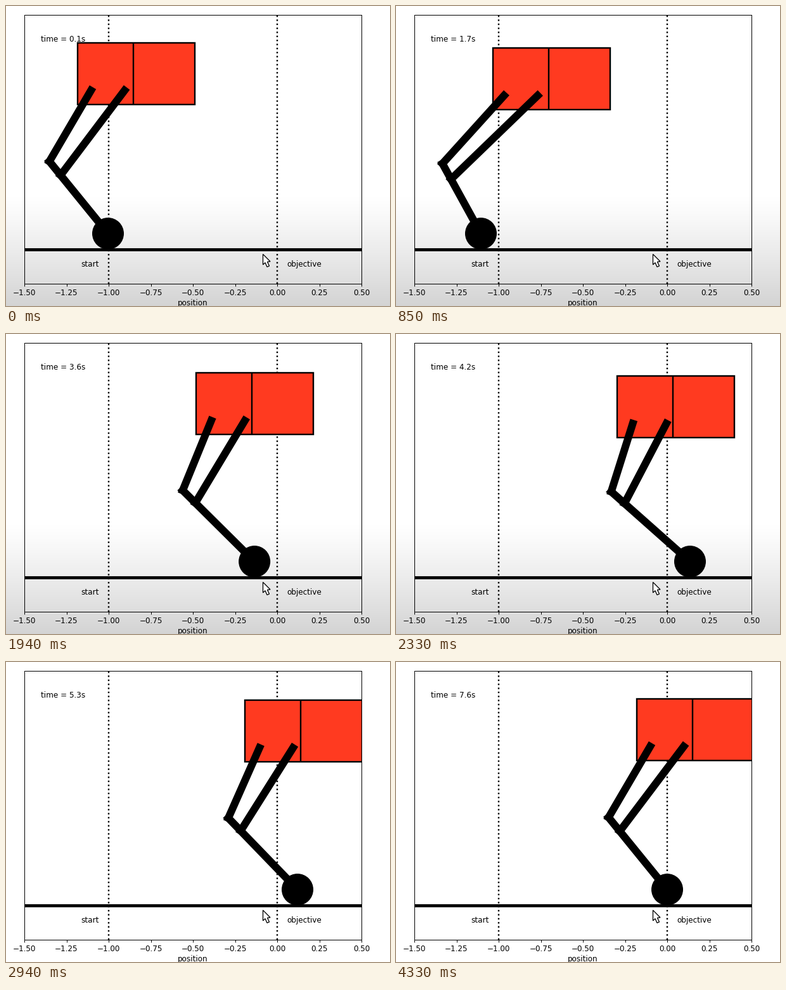
A matplotlib script that plays this animation: 606 by 472 pixels, repeating every 4.39 s.

```python
import numpy as np
import matplotlib.pyplot as plt
from matplotlib.animation import FuncAnimation
from matplotlib.patches import Circle, Polygon, Rectangle

W, H, DPI = 606, 472, 64
PX = 72 / DPI  # points per pixel
LOOP, STEP = 4390, 10
LEFT, RIGHT, TOP, BOTTOM = 29, 561, 14, 437
GROUND, WHEEL_Y, WHEEL_R = 383.5, 358, 25
BOX_W, BOX_H, DIVIDER = 185, 97, 88

plt.rcParams.update({"font.family": "DejaVu Sans", "font.size": 12 * PX})


def smooth_curve(keys):
    """Cubic Hermite curve through (time, value) keys, at rest at both ends."""
    ts, vs = np.array(keys, float).T
    slopes = np.gradient(vs, ts)
    slopes[0] = slopes[-1] = 0

    def value(t):
        i = int(np.clip(np.searchsorted(ts, t, side="right") - 1, 0, len(ts) - 2))
        h = ts[i + 1] - ts[i]
        u = (t - ts[i]) / h
        return ((1 + 2 * u) * (1 - u) ** 2 * vs[i] + u * (1 - u) ** 2 * h * slopes[i]
                + u * u * (3 - 2 * u) * vs[i + 1] + u * u * (u - 1) * h * slopes[i + 1])

    return value


# Left edge of the box, and how far the wheel trails behind its rest place
box_x = smooth_curve([(0, 113), (400, 125), (850, 153), (1120, 178), (1460, 236),
                      (2180, 330), (2330, 349), (2940, 377), (3460, 380),
                      (3900, 380), (LOOP, 380)])
lean = smooth_curve([(0, 0), (400, 42), (850, 67), (1150, 54), (1460, 15), (1900, -40),
                     (2330, -67), (2940, -35), (3460, 0), (3900, 0), (LOOP, 0)])


def clock(ms):
    return np.interp(ms, [0, 850, 2940, 4330, LOOP], [0.1, 1.68, 5.28, 7.62, 7.64])


def shade_level(ms):
    return np.interp(ms, [2400, 2650, 3380, 3450, 3560, 3780], [1, 0, 0, 1, 1, 0])


fig = plt.figure(figsize=(W / DPI, H / DPI), dpi=DPI, facecolor="white")
ax = fig.add_axes([LEFT / W, 1 - BOTTOM / H, (RIGHT - LEFT) / W, (BOTTOM - TOP) / H])
ax.set(xlim=(LEFT, RIGHT), ylim=(BOTTOM, TOP))
ax.patch.set_visible(False)
for spine in ax.spines.values():
    spine.set_linewidth(PX)

positions = np.linspace(-1.5, 0.5, 9)
labels = [f"{p:.2f}".replace("-", "\u2212") for p in positions]
ax.set_xticks(np.linspace(LEFT, RIGHT, 9), labels)
ax.set_yticks([])
ax.tick_params(axis="x", length=4.2 * PX, width=PX, pad=4.2 * PX)

# Grey shade rising from the bottom edge
ramp = 0.17 * np.linspace(1, 0, 172) ** 1.15
ramp = np.repeat(ramp[:, None, None], W, axis=1).repeat(3, axis=2)
shade = fig.figimage(1 - ramp, 0, 0, origin="lower", zorder=-1)


def line(width, xs=(), ys=(), **kw):
    return ax.plot(xs, ys, color="black", lw=width * PX, **kw)[0]


def label(x, y, text, **kw):
    return ax.text(x, y, text, va="baseline", **kw)


for x in (162, 428):
    line(2.4, (x, x), (BOTTOM, TOP), ls=":", zorder=1)
line(4.8, (LEFT, RIGHT), (GROUND, GROUND), zorder=2)

box = ax.add_patch(Rectangle((0, 0), BOX_W, BOX_H, fc="#ff3a20", ec="black",
                             lw=2.4 * PX, zorder=3))
divider = line(2.4, zorder=4, solid_capstyle="butt")
thigh, strut, shank = (line(12, zorder=5, solid_capstyle="projecting") for _ in range(3))
wheel = ax.add_patch(Circle((0, WHEEL_Y), WHEEL_R, color="black", lw=0, zorder=6))

arrow = [(405.5, 390.5), (405.5, 407), (409, 403.8), (412, 410.5), (415.5, 409),
         (412.5, 402.5), (417, 402)]
ax.add_patch(Polygon(arrow, fc="white", ec="black", lw=1.3 * PX, zorder=8))

label(118, 410.5, "start")
label(443.6, 410.5, "objective")
label(295, 471, "position", ha="center")
timer = label(54.8, 56, "")


def join(limb, a, b):
    limb.set_data((a[0], b[0]), (a[1], b[1]))


def update(i):
    ms = i * STEP
    x, e = box_x(ms), lean(ms)
    sag = (e / 67) ** 2
    top = 58 + 8 * sag

    hub = np.array([x + 48 - e, WHEEL_Y])
    knee = np.array([x - 44.5 - 0.525 * e, 244.5 + 3.5 * sag])
    hip = np.array([x + 21 - 0.053 * e, top + 75])
    down = (hub - knee) / np.hypot(*(hub - knee))

    box.set_xy((x, top))
    join(divider, (x + DIVIDER, top), (x + DIVIDER, top + BOX_H))
    join(thigh, knee, hip)
    join(strut, knee + 28 * down, hip + (53, 0))
    join(shank, knee, hub)
    wheel.center = hub

    timer.set_text(f"time = {clock(ms):.1f}s")
    shade.set_data(1 - shade_level(ms) * ramp)
    return box, divider, thigh, strut, shank, wheel, timer, shade


anim = FuncAnimation(fig, update, frames=LOOP // STEP, interval=STEP,
                     repeat=True, repeat_delay=0, blit=False)
plt.show()
```
